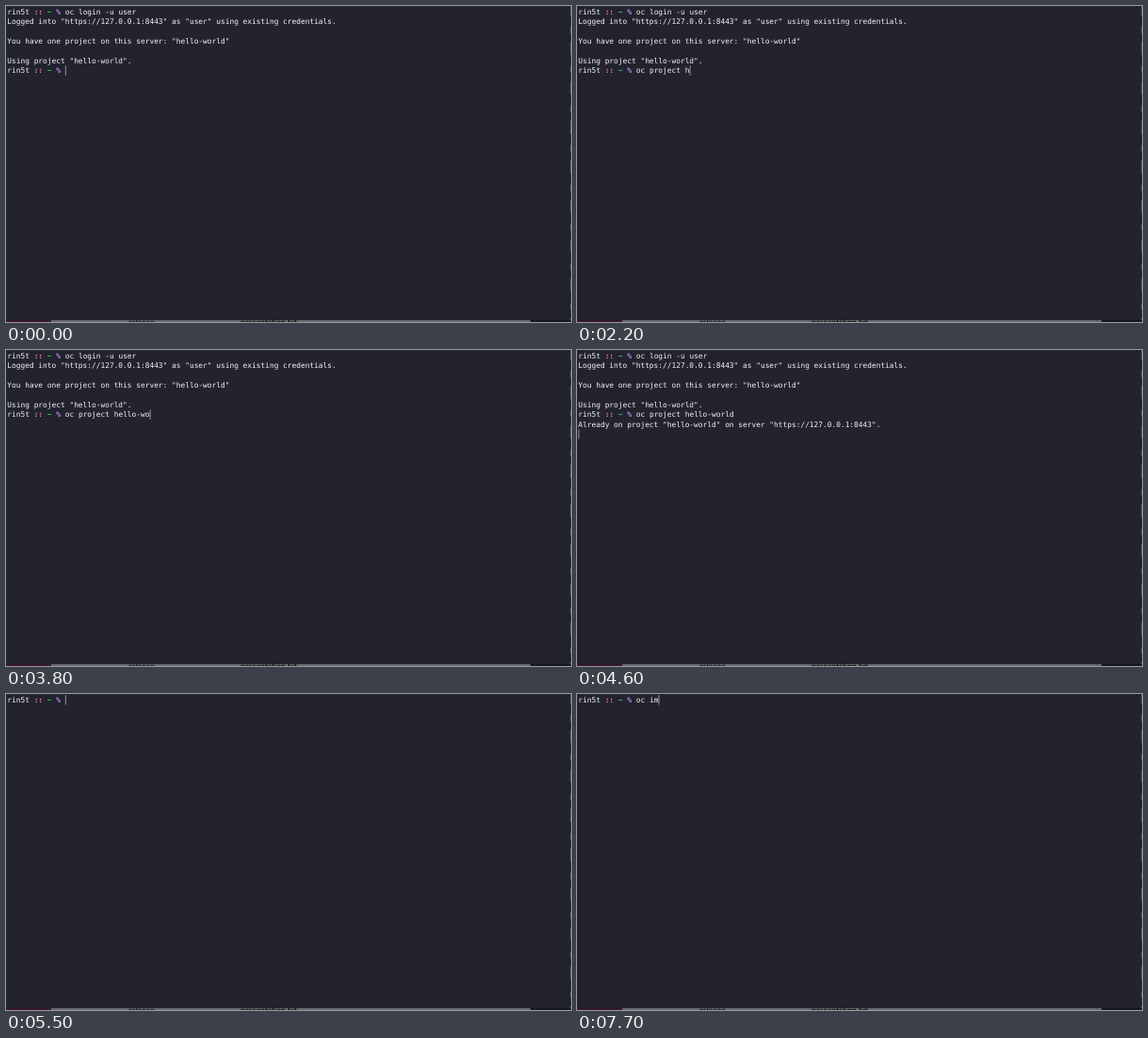
Write an HTML page that moves like this. It is 600 px wide and 336 px high and loops after 8 s.

```html
<!DOCTYPE html>
<html lang="en">
<head>
<meta charset="utf-8">
<title>Terminal session</title>
<style>
  html, body { margin: 0; width: 100%; height: 100%; overflow: hidden; background: #22232d; }
  svg { display: block; width: 600px; height: 336px; }
  text {
    font-family: "DejaVu Sans Mono", monospace;
    font-size: 7.85px;
    fill: #f4f4f4;
    white-space: pre;
    text-rendering: geometricPrecision;
  }
  .colons { fill: #ff79c6; font-weight: bold; }
  .path { fill: #50fa7b; }
  .sign { fill: #bd93f9; font-weight: bold; }
  .behind { font-family: "Liberation Sans", sans-serif; font-size: 8px; font-weight: bold; fill: #08080a; }
</style>
</head>
<body>
<svg viewBox="0 0 600 336">
  <rect width="600" height="336" fill="#22232d"/>
  <!-- desktop showing around the window -->
  <rect y="334" width="48" height="2" fill="#35152f"/>
  <rect x="48" y="334" width="509" height="2" fill="#66676b"/>
  <rect x="557" y="334" width="43" height="2" fill="#17181e"/>
  <text class="behind" x="130" y="338.5">release</text>
  <text class="behind" x="249" y="338.5">presentation.txt</text>
  <path d="M599.5 0V334" stroke="#4a4b50"/>
  <path d="M599.5 10V334" stroke="#1c1d24" stroke-dasharray="12 7 9 14"/>
  <g id="screen"></g>
  <rect id="caret" width="1" height="10.3" fill="#98989e"/>
</svg>
<script>
  const LOOP = 8000, LEFT = 1.3, COLUMN = 4.726, ROW = 10.4;
  const PROMPT = 'rin5t :: ~ % ';
  const PROMPT_MARKUP = 'rin5t <tspan class="colons">::</tspan> ' +
    '<tspan class="path">~</tspan> <tspan class="sign">%</tspan> ';

  const login = [
    PROMPT + 'oc login -u user',
    'Logged into "https://127.0.0.1:8443" as "user" using existing credentials.',
    '',
    'You have one project on this server: "hello-world"',
    '',
    'Using project "hello-world".'
  ];
  const project = [...login, PROMPT + 'oc project hello-world'];
  const result = [...project, 'Already on project "hello-world" on server "https://127.0.0.1:8443".'];

  const steps = [];
  const show = (time, lines, caretOn = true) => steps.push({ time, lines, caretOn });
  // Each entry: time, command typed so far, and false when the caret is blinked off.
  const type = (above, entries) => entries.forEach(([time, command, caretOn]) =>
    show(time, [...above, PROMPT + command], caretOn));

  type(login, [
    [0, ''], [300, 'o'], [500, 'oc'], [600, 'oc '], [700, 'oc p'],
    [1000, 'oc p', false], [1200, 'oc p'], [1300, 'oc pr'], [1400, 'oc pro'],
    [1600, 'oc proj'], [1700, 'oc projec'], [1900, 'oc project'], [2000, 'oc project '],
    [2200, 'oc project h'], [2300, 'oc project he'], [2400, 'oc project hel'],
    [2500, 'oc project hell'], [2700, 'oc project hello-'], [2900, 'oc project hello-w'],
    [3100, 'oc project hello-'], [3200, 'oc project hello-', false], [3300, 'oc project hello-'],
    [3500, 'oc project hello-w'], [3800, 'oc project hello-wo'], [3900, 'oc project hello-worl']
  ]);
  show(4100, [...project, '']);
  show(4600, [...result, '']);
  type(result, [
    [4700, ''], [4900, 'c'], [5000, 'cl'], [5200, 'cle'], [5300, 'clear']
  ]);
  type([], [
    [5500, ''], [6000, 'o'], [6100, 'oc'], [6300, 'oc '], [6500, 'oc i'],
    [7000, 'oc i', false], [7200, 'oc i'], [7500, 'oc i', false], [7700, 'oc im']
  ]);

  const screen = document.getElementById('screen');
  const caret = document.getElementById('caret');
  let current;

  function draw({ lines, caretOn }) {
    screen.innerHTML = lines.map((line, row) =>
      `<text x="${LEFT}" y="${8.9 + row * ROW}">${line.replace(PROMPT, PROMPT_MARKUP)}</text>`).join('');
    const row = lines.length - 1;
    caret.setAttribute('x', LEFT + 0.1 + lines[row].length * COLUMN);
    caret.setAttribute('y', 1.1 + row * ROW);
    caret.setAttribute('visibility', caretOn ? 'visible' : 'hidden');
  }

  const start = performance.now();
  function tick() {
    const time = (performance.now() - start) % LOOP;
    const step = steps.findLast(s => s.time <= time);
    if (step !== current) draw(current = step);
    requestAnimationFrame(tick);
  }
  tick();
</script>
</body>
</html>
```
